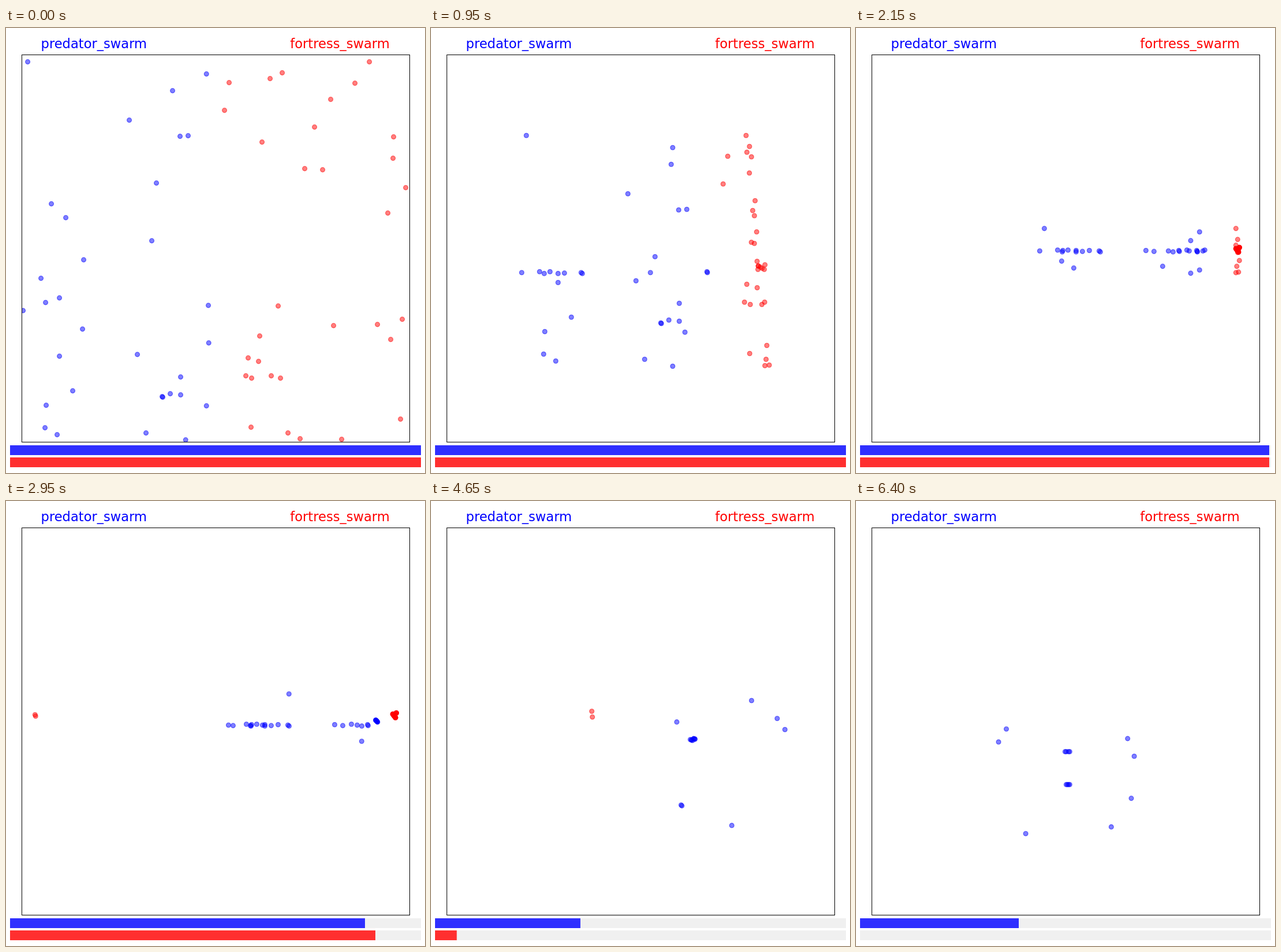
An HTML page with a canvas for the animation above (6.45 s loop, 726 px wide and 771 px high).

```html
<!DOCTYPE html>
<html>
<head>
<meta charset="utf-8">
<style>
  html, body { margin: 0; width: 100%; height: 100%; overflow: hidden; background: #fff; }
  canvas { display: block; }
</style>
</head>
<body>
<canvas id="stage" width="726" height="771"></canvas>
<script>
const ctx = document.getElementById('stage').getContext('2d');
const STEP_MS = 50, STEPS = 129, SPEED = 6.715;
const BLUE = '#00f', RED = '#f00';
const MIDDLE = 396, TURN = 56, CLASH = 59, SURVIVORS = 15;

// Start places only; everything after follows from the rules below.
const blueStart = [
  [350, 480], [132, 521], [134, 401], [115, 628], [37, 58], [60, 433], [29, 489], [68, 475],
  [69, 653], [67, 692], [78, 304], [88, 704], [92, 467], [92, 568], [103, 328], [347, 79],
  [347, 654], [311, 713], [213, 159], [227, 565], [242, 701], [252, 368], [260, 268], [270, 638],
  [271, 639], [284, 633], [288, 108], [302, 604], [301, 187], [302, 635], [315, 186], [351, 545]
];
const redStart = [
  [517, 243], [548, 245], [378, 142], [386, 94], [443, 197], [457, 87], [478, 77], [534, 171],
  [562, 123], [604, 95], [629, 58], [671, 188], [670, 225], [692, 276], [661, 320], [471, 481],
  [567, 515], [643, 513], [686, 504], [666, 539], [439, 533], [419, 571], [437, 577], [415, 602],
  [425, 606], [475, 606], [459, 602], [424, 691], [488, 701], [509, 711], [581, 712], [683, 677]
];
// Angles of the scattered survivors around their group, before and after the last fight.
const turns = [[-69, -28], [-41, -13], [-29, 21], [87, 49], [-143, -143], [137, 122], [136, 205]];

const blueLine = [[0, 458], [11, 456], [27, 391], [43, 386], [CLASH, 388]];
const redLine = [[0, 455], [11, 452], [27, 376], [43, 384], [CLASH, 371]];
const redFront = [[11, 538], [27, 597], [43, 661], [CLASH, 673]];
const blueBar = [[38, 719], [43, 716], [CLASH, 622], [66, 241], [128, 282]];
const redBar = [[38, 719], [43, 716], [CLASH, 640], [66, 70], [90, 44], [104, 47], [112, 7]];

const clamp = (v, lo, hi) => Math.min(hi, Math.max(lo, v));
const jitter = (i, size) => ((i * 7) % 5 - 2) * size;

// Piecewise linear value at step k through [step, value] points.
function along(points, k) {
  const n = points.findIndex(p => p[0] > k);
  if (n === 0) return points[0][1];
  if (n < 0) return points[points.length - 1][1];
  const [k0, a] = points[n - 1], [k1, b] = points[n];
  return a + (b - a) * (k - k0) / (k1 - k0);
}

// Each axis closes in on its goal at a fixed speed.
const approach = (start, goal, k) => clamp(goal, start - SPEED * k, start + SPEED * k);

function ring(cx, cy, r, degrees) {
  const a = degrees * Math.PI / 180;
  return [cx + r * Math.cos(a), cy + r * Math.sin(a)];
}

// The two foremost dots bounce off the enemy, one up and one down.
function bounce(side, k) {
  return [
    along([[27, 532], [43, 595], [CLASH, 553 + side * 63]], k),
    along([[27, 385], [43, 386 + side * 33], [CLASH, 375 + side * 41]], k)
  ];
}

function blueCharge(i, k) {
  const last = blueStart.length - 1;
  if (k > 27 && (i === 0 || i === last)) return bounce(i ? 1 : -1, k);
  const [x0, y0] = blueStart[i];
  const drag = 0.36 * Math.max(0, Math.abs(y0 - MIDDLE) - 150);
  const front = Math.max(x0, 351 + SPEED * k - drag);
  const run = x0 + 0.3 + SPEED * Math.min(k, 2 * TURN - k);
  const x = Math.min(run, front, 642 + jitter(i, 0.7));
  const goal = along(blueLine, k) + jitter(i, 0.8) - (x > 630 ? 7 : 0);
  return [x, approach(y0 + 0.3, goal, k)];
}

function bluePlace(i, k) {
  if (k <= CLASH) return blueCharge(i, k);
  if (i >= SURVIVORS) return k < 60 + i % 7 ? blueCharge(i, CLASH) : null;
  const turn = turns[i];
  const [x0, y0] = blueCharge(i, CLASH);
  const [x1, y1] = turn ? ring(515, 450, 112, turn[0]) : [453 + jitter(i, 2), 413 + jitter(i + 1, 0.8)];
  const [x2, y2] = turn ? ring(360, 470, 125, turn[1]) : [366 + jitter(i, 2), 434 + (i % 2) * 57];
  const x = along([[CLASH, x0], [93, x1], [105, x1 - 12 * SPEED], [128, x2]], k);
  const y = along([[CLASH, y0], [93, y1], [128, y2]], k);
  const u = clamp((k - CLASH) / (93 - CLASH), 0, 1);
  return [x + 45 * Math.sin(Math.PI * u), y];
}

// Two reds leave through the right wall and come back in from the left.
function runnerPlace(i, k) {
  if (k >= 112) return null;
  return [
    50 + i + SPEED * (Math.min(k, 106) - CLASH),
    along([[CLASH, 370 + i * 2.5], [93, 364 + i * 10], [106, 385 + i * 8]], k)
  ];
}

function redPlace(i, k) {
  const runner = i < 2;
  if (runner && k >= TURN) return runnerPlace(i, k);
  if (k >= 60 + i % 6) return null;
  const [x0, y0] = redStart[i];
  const tilt = 0.1 * (y0 - MIDDLE) * along([[11, 1], [27, 0]], k);
  const spread = jitter(i, along([[11, 0], [27, 5], [43, 1.5]], k));
  const escape = runner ? along([[49, 0], [TURN - 1, 30]], k) : 0;
  const x = approach(x0 + 0.3, along(redFront, k) + tilt + spread, k) + escape;
  const y = approach(y0 + 0.3, along(redLine, k) + jitter(i + 3, 2), k);
  return [x, y];
}

function dots(list, place, color, k) {
  ctx.fillStyle = ctx.strokeStyle = color;
  ctx.lineWidth = 1.3;
  list.forEach((_, i) => {
    const p = place(i, k);
    if (!p) return;
    ctx.beginPath();
    ctx.arc(p[0] + 0.3, p[1] + 0.3, 3.9, 0, 2 * Math.PI);
    ctx.fill();
    ctx.stroke();
  });
}

function bar(y, end, color) {
  ctx.fillStyle = '#f0f0f0';
  ctx.fillRect(7, y, 712, 17);
  ctx.fillStyle = color;
  ctx.fillRect(7, y, end - 7, 17);
}

function title(text, x, color) {
  ctx.fillStyle = color;
  ctx.fillText(text, x, 35);
}

function draw(k) {
  ctx.fillStyle = '#fff';
  ctx.fillRect(0, 0, 726, 771);
  ctx.font = '22.6px "DejaVu Sans", sans-serif';
  ctx.textAlign = 'center';
  title('predator_swarm', 152.3, BLUE);
  title('fortress_swarm', 578.5, RED);

  ctx.save();
  ctx.beginPath();
  ctx.rect(27, 46, 673, 672);
  ctx.clip();
  ctx.globalAlpha = 0.5;
  dots(blueStart, bluePlace, BLUE, k);
  dots(redStart, redPlace, RED, k);
  ctx.restore();

  ctx.strokeStyle = '#000';
  ctx.lineWidth = 1;
  ctx.strokeRect(27.5, 46.5, 672, 671);
  bar(723, along(blueBar, k), '#2f2fff');
  bar(744, along(redBar, k), '#ff2f2f');
}

const begin = performance.now();
function tick() {
  draw(Math.floor((performance.now() - begin) / STEP_MS) % STEPS);
  requestAnimationFrame(tick);
}
tick();
</script>
</body>
</html>
```
